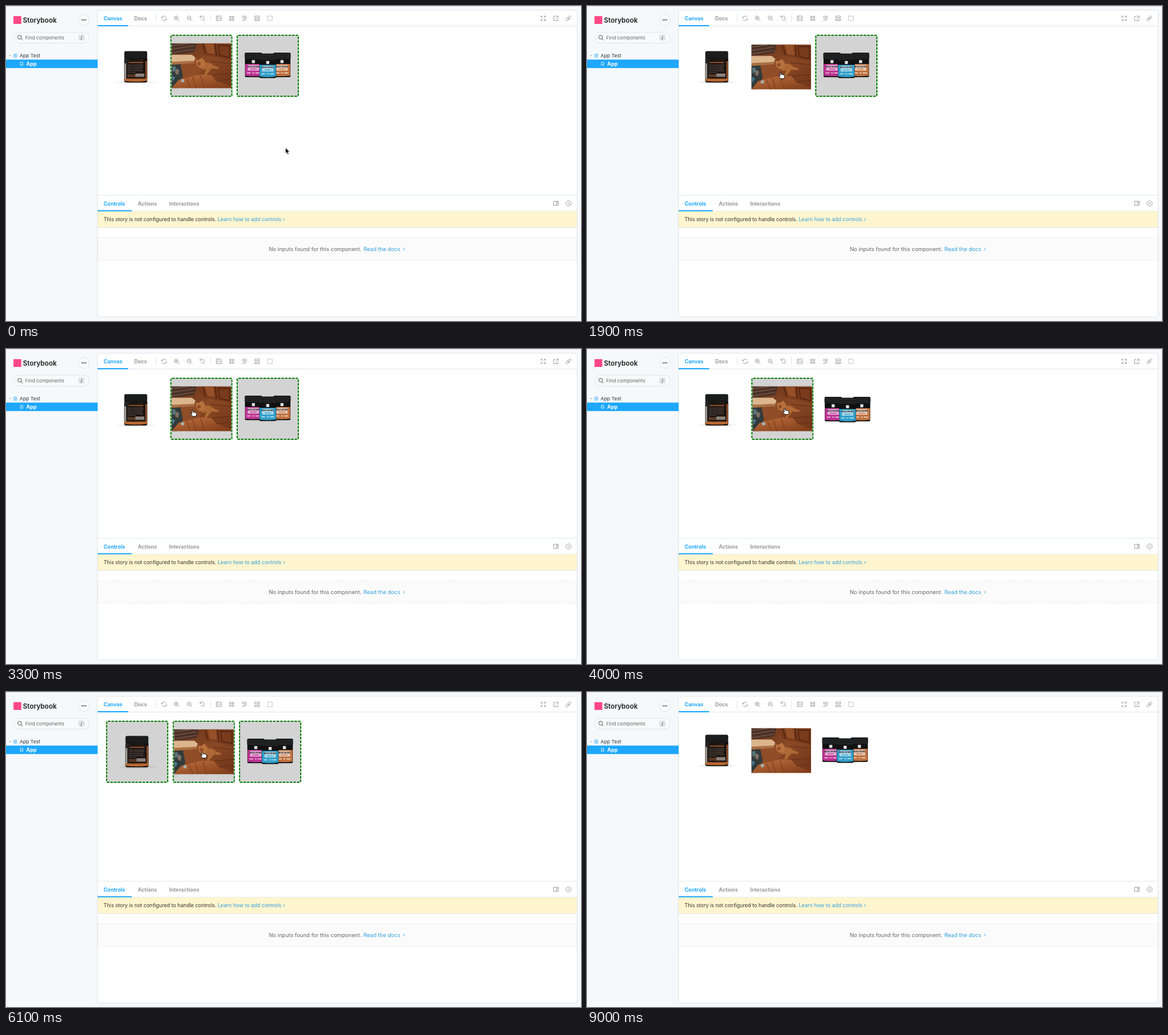
Animation, 960 px wide and 527 px high, one loop 9270 ms. Source, as an HTML page:

```html
<!DOCTYPE html>
<html lang="en">
<head>
<meta charset="utf-8">
<title>Component canvas</title>
<style>
  html, body { margin: 0; width: 100%; height: 100%; overflow: hidden; background: #f6f9fc; }
  #stage { position: relative; width: 960px; height: 527px; overflow: hidden; }
  #stage > svg { position: absolute; left: 0; top: 0; }
  text { font-family: Inter, "Open Sans", sans-serif; font-size: 8.6px; fill: #333; }
  .bold { font-weight: 700; }
  .muted { fill: #999; }
  .blue { fill: #1ea7fd; }
  .link { fill: #2f9fdd; }
  .line { fill: none; stroke: #e3e6e8; }
  .icons { fill: none; stroke: #999; stroke-width: .9; }
  /* laid out at 1.5x, so that the 3px dashes come out 4 long and 2 apart */
  #row { position: absolute; left: 166.7px; top: 48px; display: flex; gap: 10.5px; align-items: flex-end;
         transform: scale(.66667); transform-origin: 0 0; }
  .tile { flex: none; width: 150px; height: 150px; }
  .tile svg { display: block; width: 150px; height: 150px; }
  .tile.on { border: 3px dashed green; border-radius: 5px; background: #d3d3d3; }
  .tiny { font-size: 2.9px; font-weight: 800; text-anchor: middle; }
</style>
</head>
<body>
<div id="stage">
  <svg width="960" height="527" viewBox="0 0 960 527">
    <defs>
      <g id="lens"><circle cx="-.8" cy="-.8" r="3.2"/><path d="M1.6 1.6 4.4 4.4"/></g>
    </defs>
    <rect width="960" height="527" fill="#f6f9fc"/>
    <path d="M0 .5H960" stroke="#dcdfe3"/>
    <rect x="152.5" y="7" width="801" height="513.5" rx="2.5" fill="#fff" stroke="#e1e5e9"/>

    <!-- sidebar -->
    <rect x="12.5" y="17" width="13" height="13" fill="#ff4785"/>
    <text class="bold" x="28.2" y="27.6" style="font-size:11.1px">Storybook</text>
    <circle cx="130" cy="23.3" r="9" fill="#f9fbfd" stroke="#d8dde2" stroke-width=".8"/>
    <g fill="#333"><circle cx="127" cy="23.3" r="1"/><circle cx="130" cy="23.3" r="1"/><circle cx="133" cy="23.3" r="1"/></g>
    <rect x="13" y="44" width="126" height="18" rx="9" fill="#f8fafc" stroke="#d8dde2" stroke-width=".8"/>
    <use href="#lens" x="23.5" y="53" fill="none" stroke="#444" stroke-width=".9"/>
    <text x="32" y="56" style="font-size:8px;fill:#666">Find components</text>
    <rect x="121" y="47.7" width="10" height="10" rx="2" fill="#dfe3e7"/>
    <text x="124.5" y="55.7" style="font-size:7.5px">/</text>
    <path d="M5.2 82.2h3.6L7 84.3z" fill="#aaa"/>
    <path d="M13 80.3h5v5.4h-5zM15.5 80.3v5.4M13 83h5" fill="none" stroke="#4db4ee" stroke-width=".8"/>
    <text x="22.8" y="86" style="font-size:8.2px">App Test</text>
    <rect y="89.6" width="153" height="14.2" class="blue"/>
    <path d="M24 94.3h4v5.4l-2-1.8-2 1.8z" fill="none" stroke="#fff" stroke-width=".8"/>
    <text class="bold" x="33.8" y="100.1" style="fill:#fff">App</text>

    <!-- toolbar -->
    <path class="line" d="M153 33.5H953M250.5 14v13M341.5 14v13"/>
    <rect x="153" y="32" width="51" height="2" class="blue"/>
    <text class="bold blue" x="163" y="24">Canvas</text>
    <text class="bold muted" x="214" y="24">Docs</text>
    <g class="icons">
      <path d="M260.2 20a3.8 3.8 0 0 1 7.3-.7M267.8 21.3a3.8 3.8 0 0 1-7.3 1M259 18.5l1.2 1.8 1.7-1.3M269 23l-1.2-1.8-1.7 1.3"/>
      <use href="#lens" x="285" y="20.7"/><path d="M282.3 19.9h3.8M284.2 18v3.8"/>
      <use href="#lens" x="306.5" y="20.7"/><path d="M303.8 19.9h3.8"/>
      <path d="M324.3 18.7a3.4 3.4 0 1 1 .8 3.8M329.5 22.2l2.7 2.6M324 16v3h3"/>
      <path d="M351.2 16.8h8v7.6h-8zM351.2 23l2.6-2.5 1.6 1.4 2-2.2 1.8 1.8"/><circle cx="353.5" cy="18.7" r=".6"/>
      <path d="M373.2 17.2h2.5v2.5h-2.5zM377.7 17.2h2.5v2.5h-2.5zM373.2 21.7h2.5v2.5h-2.5zM377.7 21.7h2.5v2.5h-2.5z"/>
      <path d="M394 17.2h8M394 19.4h8M396.5 21.7h5.5M394 23.9h6"/>
      <path d="M415.3 16.9h8v2.6h-8zM415.3 22h8v2.6h-8zM417.4 22v1.3M421.2 22v1.3"/>
      <path d="M436.7 16.9h7.8v7.6h-7.8z" stroke-dasharray="1.5 1"/>
      <path d="M893.3 19.3v-2.4h2.4M898.1 16.9h2.4v2.4M900.5 22v2.4h-2.4M895.7 24.4h-2.4V22M893.3 16.9l2.5 2.5M900.5 16.9l-2.5 2.5M893.3 24.4l2.5-2.5M900.5 24.4l-2.5-2.5"/>
      <path d="M917.3 17.2h-3v7.3h7.2v-3M918.6 16.8h3.2V20M921.8 16.8l-4.6 4.6"/>
      <g transform="rotate(-45 939 20.7)"><rect x="934" y="19" width="5.8" height="3.4" rx="1.7"/><rect x="938.2" y="19" width="5.8" height="3.4" rx="1.7"/></g>
      <path d="M914.3 326.7h7.8v7h-7.8zM919.3 326.7v7M920.2 328.5h1.2M920.2 330.2h1.2"/>
      <circle cx="939.3" cy="330.3" r="4.3"/><path d="M937.7 328.7l3.2 3.2M940.9 328.7l-3.2 3.2"/>
    </g>

    <!-- addon panel -->
    <path class="line" d="M153 316.5H953M153 343.3H953"/>
    <rect x="153" y="343.6" width="800" height="26.6" fill="#fff5cf"/>
    <rect x="153" y="341.5" width="57" height="2" class="blue"/>
    <text class="bold blue" x="163" y="333.5">Controls</text>
    <text class="bold muted" x="220" y="333.5">Actions</text>
    <text class="bold muted" x="272.5" y="333.5">Interactions</text>
    <path class="line" d="M153 370.5H953"/>
    <text x="163" y="360.3" style="font-size:8.55px">This story is not configured to handle controls.</text>
    <text class="link" x="353.5" y="360.3">Learn how to add controls</text>
    <rect x="153" y="387.5" width="800" height="38" fill="#fbfbfb" stroke="#e2e2e2" stroke-width=".7" stroke-dasharray="2 1.4"/>
    <text x="438.7" y="410" style="font-size:9.1px;fill:#666">No inputs found for this component.</text>
    <text class="link" x="596.7" y="410" style="font-size:9.1px">Read the docs</text>
    <path d="M463 355l2 2.2-2 2.2M663.3 404.5l2 2.2-2 2.2" fill="none" stroke="#2f9fdd" stroke-width=".9"/>
  </svg>

  <div id="row">
    <div class="tile"><svg viewBox="0 0 100 100">
      <defs>
        <linearGradient id="soft"><stop stop-color="#000" stop-opacity="0"/><stop offset=".5" stop-color="#000" stop-opacity=".14"/><stop offset="1" stop-color="#000" stop-opacity="0"/></linearGradient>
        <linearGradient id="dark"><stop stop-color="#302b28"/><stop offset=".3" stop-color="#15120f"/><stop offset=".75" stop-color="#251a15"/><stop offset="1" stop-color="#0e0b0a"/></linearGradient>
      </defs>
      <ellipse cx="50" cy="75.5" rx="37" ry="2.4" fill="url(#soft)"/>
      <rect x="30.3" y="34" width="38.6" height="42" rx="3" fill="url(#dark)"/>
      <rect x="30.5" y="23.5" width="38.2" height="12.5" rx="2.5" fill="#171918"/>
      <path d="M32 26h35M32 29h35M32 32h35" stroke="#292c2b" stroke-width=".7"/>
      <path d="M31 44h2.4v26h-2.4z" fill="#a9a49e"/>
      <path d="M65.8 40h2.6v30h-2.6z" fill="#9b5630"/>
      <path d="M30.5 69.5h38.2v3.8q-19 2.6-38.2 0z" fill="#b96832"/>
      <path d="M38 42.5h24" stroke="#a65c34" stroke-width="1.6"/>
      <path d="M37 47h25M37 50h25M37 53h23M37 56h25M37 59h12" stroke="#706158" stroke-width=".8"/>
      <path d="M36 62h13v5h-13z" fill="#593722"/>
      <path d="M49 61h15v5.5h-15z" fill="#8b8179"/>
    </svg></div>

    <div class="tile"><svg viewBox="0 0 100 100">
      <defs>
        <linearGradient id="wood" x2="1" y2="1"><stop stop-color="#5f331d"/><stop offset=".5" stop-color="#8a4824"/><stop offset="1" stop-color="#6f3418"/></linearGradient>
        <linearGradient id="rail" y2="1"><stop stop-color="#c0713f"/><stop offset="1" stop-color="#7c3a17"/></linearGradient>
        <clipPath id="crop"><path d="M0 0h100v75H0z"/></clipPath>
      </defs>
      <g transform="translate(0 12.5)" clip-path="url(#crop)">
        <path d="M0 0h100v75H0z" fill="url(#wood)"/>
        <path d="M0 0h42l-4 14L0 19z" fill="#493129"/>
        <path d="M0 4l32-4M0 10l38-6M0 16l38-6" stroke="#75533d" stroke-width="1.5"/>
        <path d="M44 0h56v28L52 18z" fill="#793b1b"/>
        <path d="M52 0l5 17M73 0l2 21M78 3l19 1v20l-17-4z" fill="none" stroke="#4c210f" stroke-width="1.4"/>
        <path d="M56 0l4 16 12 2-2-18z" fill="#965028"/>
        <path d="M15 35l26-3 8 14-9 10-24 6z" fill="#8f4d28"/>
        <path d="M0 19l34 0 6 5-3 8L0 33z" fill="#dbb58d"/>
        <path d="M0 31l38-2 1 4-39 3z" fill="#aa7043"/>
        <path d="M0 36l15-1 4 20-9 20H0z" fill="#333b3b"/>
        <path d="M1 39l5-1 2 8-6 2z" fill="#58757a"/>
        <path d="M8 42l5 3-2 8-5-3z" fill="#807065"/>
        <path d="M1 54l5 3-4 7z" fill="#47819a"/>
        <path d="M65 30l35 4M60 54l40-4M65 64l35-4" stroke="#5f2e15"/>
        <path d="M52 33q12-3 18 4l9 3-1 3-11-1-4 5-5 6-3-1 3-9-8 1z" fill="#ad6835"/>
        <path d="M40 27l5 1 6-4 5 6-1 8-7 4-6-5z" fill="#b8713d"/>
        <circle cx="46" cy="34" r="3" fill="#8e4e28"/>
        <path d="M0 75l12-14 36-9 19 1 8 10 25 9v3z" fill="url(#rail)"/>
        <path d="M25 59l7 16M35 56l6 19M48 53l7 22" stroke="#7f3f1b" stroke-width="1.2"/>
        <path d="M16 60h5v5h-5z" fill="#a7b3b1"/>
      </g>
    </svg></div>

    <div class="tile"><svg viewBox="0 0 100 100">
      <defs><g id="jar">
        <rect x=".4" y="8" width="28.2" height="33" rx="2.5" fill="#111"/>
        <rect width="29" height="11" rx="2" fill="#1b1c1d"/>
        <path d="M1 3h27M1 6h27M1 9h27" stroke="#343536" stroke-width=".6"/>
        <rect x="12" y="12.5" width="5" height="5" fill="#e6e6e6"/>
        <path d="M.8 19h27.4v19.5q-14 2-27.4 0z" fill="currentColor"/>
        <path d="M5 20.5h19v9.5H5z" fill="#fff" fill-opacity=".6"/>
        <text class="tiny" x="14.5" y="24.5">MEADOW MIX</text>
        <path d="M9 27.5h11" stroke="currentColor" stroke-width="1.2"/>
        <path d="M4 34h6M13 34h3M18 34h7" stroke="#fff" stroke-opacity=".75" stroke-width="1.5"/>
      </g></defs>
      <ellipse cx="50" cy="68.5" rx="46" ry="2.4" fill="url(#soft)"/>
      <use href="#jar" x="11.5" y="28" color="#bd3493"/>
      <use href="#jar" x="59.3" y="28" color="#c0723f"/>
      <use href="#jar" x="35.5" y="29.5" color="#319fca"/>
    </svg></div>
  </div>

  <svg width="960" height="527" viewBox="0 0 960 527">
    <g id="cursor" stroke-linejoin="round">
      <path id="arrow" d="M0 0v9.8l2.2-2 1.6 3.6 1.9-.8-1.6-3.5h3.1z" fill="#000" stroke="#fff" stroke-width=".8"/>
      <path id="hand" d="M-1.2 1Q-1 -.3 .2 .1L1.5 3.8 3 3.5l1.5.5 1.6.3q1 .3 1 1.7 0 2.7-1.2 4.6H.6Q-.8 8.6-3.1 6.7q-.3-1.3 1.1-1.1l1.3.8z" fill="#fff" stroke="#000" stroke-width=".9"/>
    </g>
  </svg>
</div>
<script>
  const LOOP = 9270, STEP = 100, CURSOR_GONE = 7400;
  const START = [false, true, true];
  // [time, tile]: each click toggles a tile
  const CLICKS = [[1700, 1], [2100, 1], [2600, 0], [3100, 0], [3600, 2], [4100, 1],
                  [4400, 2], [4800, 0], [5400, 1], [6400, 0], [6700, 1], [7100, 2]];
  // [time, x, y] of the pointer tip
  const PATH = [[0, 466.5, 237], [800, 466.5, 237], [1600, 323, 111], [2150, 323, 111],
                [2500, 234, 103.5], [3150, 234, 103.5], [3500, 430, 100], [3700, 430, 100],
                [3950, 330, 99], [4100, 330, 99], [4350, 430, 99], [4420, 430, 99],
                [4750, 254, 97], [4950, 254, 97], [5300, 328, 100], [6200, 328, 100],
                [6380, 225, 100], [6420, 225, 100], [6650, 325, 98], [6720, 325, 98],
                [6950, 434, 95], [7150, 434, 95], [7350, 445, 38]];
  const byId = id => document.getElementById(id);
  const tiles = [...document.querySelectorAll('.tile')];
  const show = (el, on) => { el.style.display = on ? '' : 'none'; };

  function pointerAt(t) {
    const next = PATH.findIndex(p => p[0] > t);
    if (next < 0) return PATH[PATH.length - 1].slice(1);
    const [t0, x0, y0] = PATH[next - 1], [t1, x1, y1] = PATH[next];
    const u = (t - t0) / (t1 - t0), ease = u * u * (3 - 2 * u);
    return [x0 + (x1 - x0) * ease, y0 + (y1 - y0) * ease];
  }

  function draw(t) {
    const on = [...START];
    for (const [time, tile] of CLICKS) if (time <= t) on[tile] = !on[tile];
    tiles.forEach((tile, i) => tile.classList.toggle('on', on[i]));

    const [x, y] = pointerAt(t);
    const over = tiles.some(tile => {
      const box = tile.getBoundingClientRect();
      return x >= box.left && x <= box.right && y >= box.top && y <= box.bottom;
    });
    byId('cursor').setAttribute('transform', `translate(${x} ${y})`);
    show(byId('cursor'), t < CURSOR_GONE);
    show(byId('hand'), over);
    show(byId('arrow'), !over);
  }

  const begin = performance.now();
  function tick() {
    const t = (performance.now() - begin) % LOOP;
    draw(Math.floor(t / STEP) * STEP);
    requestAnimationFrame(tick);
  }
  tick();
</script>
</body>
</html>
```
